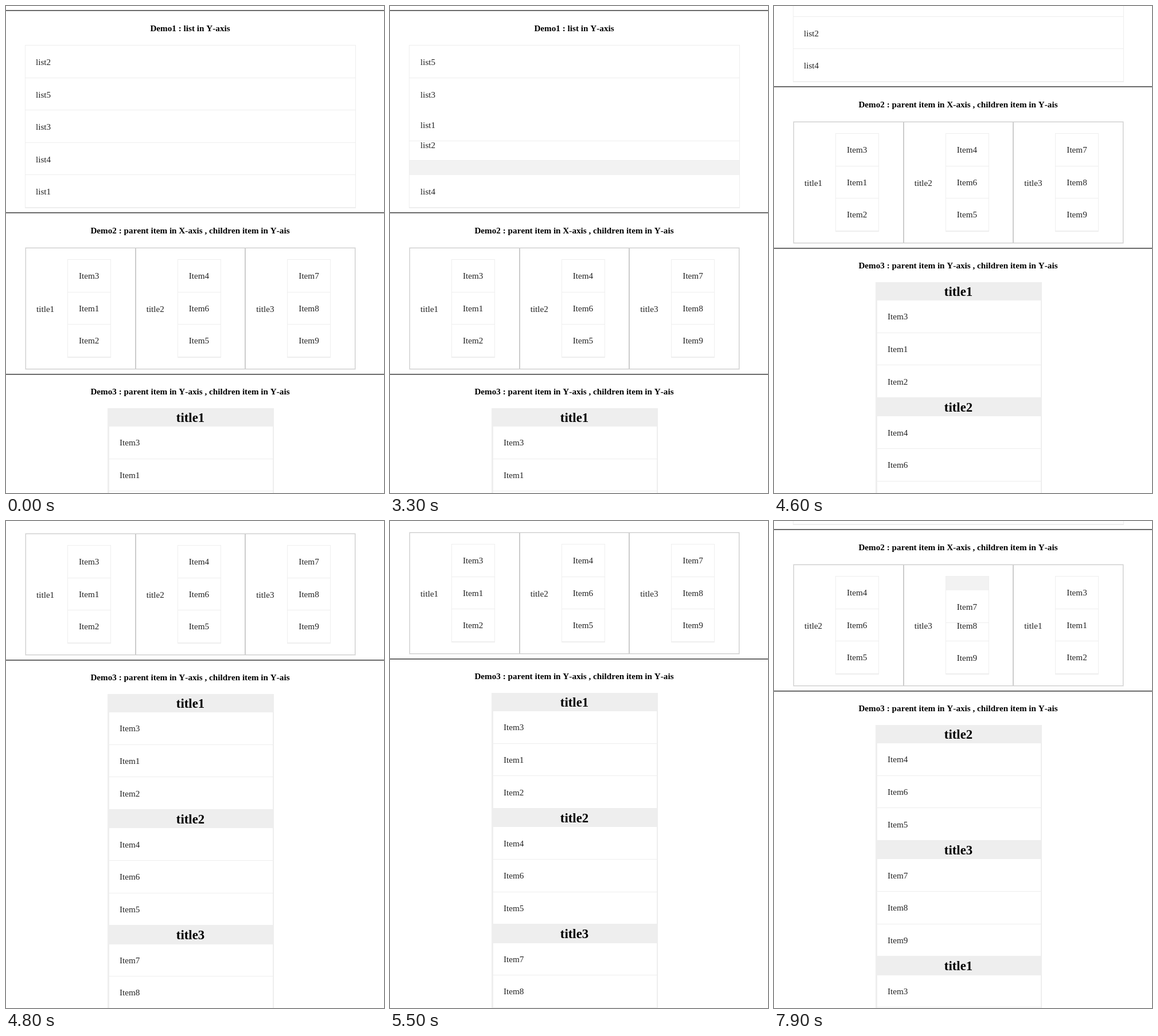
Write an HTML page that moves like this. It is 659x850 px and loops after 8 s.

```html
<!DOCTYPE html>
<html lang="en">
<head>
<meta charset="utf-8">
<title>Sortable lists</title>
<style>
  html, body { margin: 0; width: 100%; height: 100%; overflow: hidden; background: #fff; }
  svg { display: block; width: 659px; height: 850px; }
  rect { shape-rendering: crispEdges; }
  text { font: 15.2px "Liberation Serif", "Times New Roman", serif; font-kerning: none; fill: #222; }
  .heading, .title { font-weight: bold; fill: #000; text-anchor: middle; }
  .title { font-size: 22.8px; }
</style>
</head>
<body>
<svg id="stage" viewBox="0 0 659 850"></svg>
<script>
const LOOP = 8000, STEP = 100;
const ROW = 56.6, COLUMN = 191.67, GROUP = 202.3, SWAP_TIME = 300;
const LINE = '#eee', GAP = '#f2f2f2', BORDER = '#ccc';
const stage = document.getElementById('stage');

const { round } = Math;
const clamp = p => Math.min(1, Math.max(0, p));
const smooth = p => { p = clamp(p); return p * p * (3 - 2 * p); };
const easeOut = p => 1 - (1 - clamp(p)) ** 2;

// Linear interpolation through [time, value] points.
function track(points, t) {
  const next = points.findIndex(([time]) => time > t);
  if (next === 0) return points[0][1];
  if (next < 0) return points.at(-1)[1];
  const [t0, v0] = points[next - 1], [t1, v1] = points[next];
  return v0 + (v1 - v0) * (t - t0) / (t1 - t0);
}

const scrollPath = [
  [4300, 0], [4400, 28], [4500, 110], [4600, 220], [4700, 325], [4800, 400],
  [4900, 432], [5000, 443], [5100, 446], [5300, 446],
  [5400, 440], [5500, 402], [5600, 360], [5700, 346]
];
const columnPath = [[6500, 0], [6600, 73], [6900, 290], [7100, 388], [7300, 388], [7400, 383]];

const listDrags = [
  { start: 1500, end: 2500, from: 0, to: 2, swaps: [1700, 1900],
    move: t => 2 * ROW * smooth((t - 1400) / 800) },
  { start: 2900, end: 4000, from: 4, to: 1, swaps: [3000, 3200, 3400],
    move: t => -3 * ROW * smooth((t - 2800) / 800) }
];
const columnDrags = [
  { start: 6600, end: 7500, from: 0, to: 2, swaps: [6700, 6900], move: t => track(columnPath, t) }
];
const itemDrag = { start: 7900, end: LOOP, from: 0, to: 0, swaps: [], move: () => 24 };

const list = ['list2', 'list5', 'list3', 'list4', 'list1'];
const groups = [
  { title: 'title1', items: ['Item3', 'Item1', 'Item2'] },
  { title: 'title2', items: ['Item4', 'Item6', 'Item5'] },
  { title: 'title3', items: ['Item7', 'Item8', 'Item9'] }
];

const activeDrag = (drags, t) => drags.find(d => t >= d.start && t < d.end);

function orderAt(items, drags, t) {
  const order = [...items];
  for (const d of drags) if (t >= d.end) order.splice(d.to, 0, ...order.splice(d.from, 1));
  return order;
}

function offsetAt(slot, drag, pitch, t) {
  if (!drag) return 0;
  if (slot === drag.from) return drag.move(t);
  const direction = Math.sign(drag.to - drag.from);
  const passed = (slot - drag.from) * direction - 1;
  const swap = drag.swaps[passed];
  return swap === undefined ? 0 : -direction * pitch * easeOut((t - swap) / SWAP_TIME);
}

// Draws every slot at its current position, the dragged one on top.
function place(items, drag, origin, pitch, t, draw) {
  const parts = items.map((item, i) =>
    draw(item, origin + i * pitch + offsetAt(i, drag, pitch, t)));
  if (drag) parts.push(...parts.splice(drag.from, 1));
  return parts.join('');
}

const rect = (x, y, w, h, fill) =>
  `<rect x="${x}" y="${y}" width="${w}" height="${h}" fill="${fill}"/>`;
const frame = (x, y, w, h, stroke, fill) =>
  rect(x, y, w, h, stroke) + rect(x + 1, y + 1, w - 2, h - 2, fill);
const text = (x, y, label, kind = '') =>
  `<text x="${x}" y="${round(y)}" class="${kind}">${label}</text>`;

function row(x, y, w, label, textX, textY) {
  const top = round(y), line = round(y + ROW - 1);
  return rect(x, top, w, line - top, '#fff') + rect(x, line, w, 1, LINE) +
    text(textX, y + textY, label);
}

function section(y, label) {
  const top = round(y);
  return rect(0, top, 659, 1, '#505050') + rect(0, top + 1, 659, 1, '#858585') +
    text(321, y + 36.6, label, 'heading');
}

function verticalList(t) {
  const drag = activeDrag(listDrags, t);
  return frame(33, 68, 577, 285, LINE, drag ? GAP : '#fff') +
    place(orderAt(list, listDrags, t), drag, 69, ROW, t, (label, y) =>
      row(34, y, 575, label, drag ? 53 : 52, 34));
}

function column(group, left, moving, t) {
  const drag = group.title === 'title3' ? activeDrag([itemDrag], t) : null;
  const textY = moving || drag ? 34 : 33;
  const x = round(left), inner = round(left + 73);
  return frame(x, 422, round(left + COLUMN) - x, 212, BORDER, '#fff') +
    text(left + 19, 534, group.title) +
    frame(inner, 442, 76, 172, LINE, drag ? GAP : '#fff') +
    place(group.items, drag, 443, ROW, t, (label, y) =>
      row(inner + 1, y, 74, label, left + 93, textY));
}

function columns(order, t) {
  const drag = activeDrag(columnDrags, t);
  return frame(33, 421, 577, 214, LINE, drag ? GAP : '#fff') +
    place(order, drag, 34, COLUMN, t, (group, left) => column(group, left, drag, t));
}

function stackedGroups(order) {
  return rect(177, 702, 290, 610, LINE) + order.map((group, g) => {
    const top = 734 + g * GROUP;
    return text(321.5, top - 8.4, group.title, 'title') +
      place(group.items, null, top, ROW, 0, (label, y) => row(180, y, 285, label, 198, 33.3));
  }).join('');
}

function render(t) {
  const order = orderAt(groups, columnDrags, t);
  stage.innerHTML = `<g transform="translate(0 ${-round(track(scrollPath, t))})">` +
    section(7, 'Demo1 : list in Y-axis') + verticalList(t) +
    section(360, 'Demo2 : parent item in X-axis , children item in Y-ais') + columns(order, t) +
    section(641.6, 'Demo3 : parent item in Y-axis , children item in Y-ais') + stackedGroups(order) +
    '</g>';
}

let shown = -1;
function tick() {
  const t = Math.floor(performance.now() % LOOP / STEP) * STEP;
  if (t !== shown) render(shown = t);
  requestAnimationFrame(tick);
}
tick();
</script>
</body>
</html>
```
